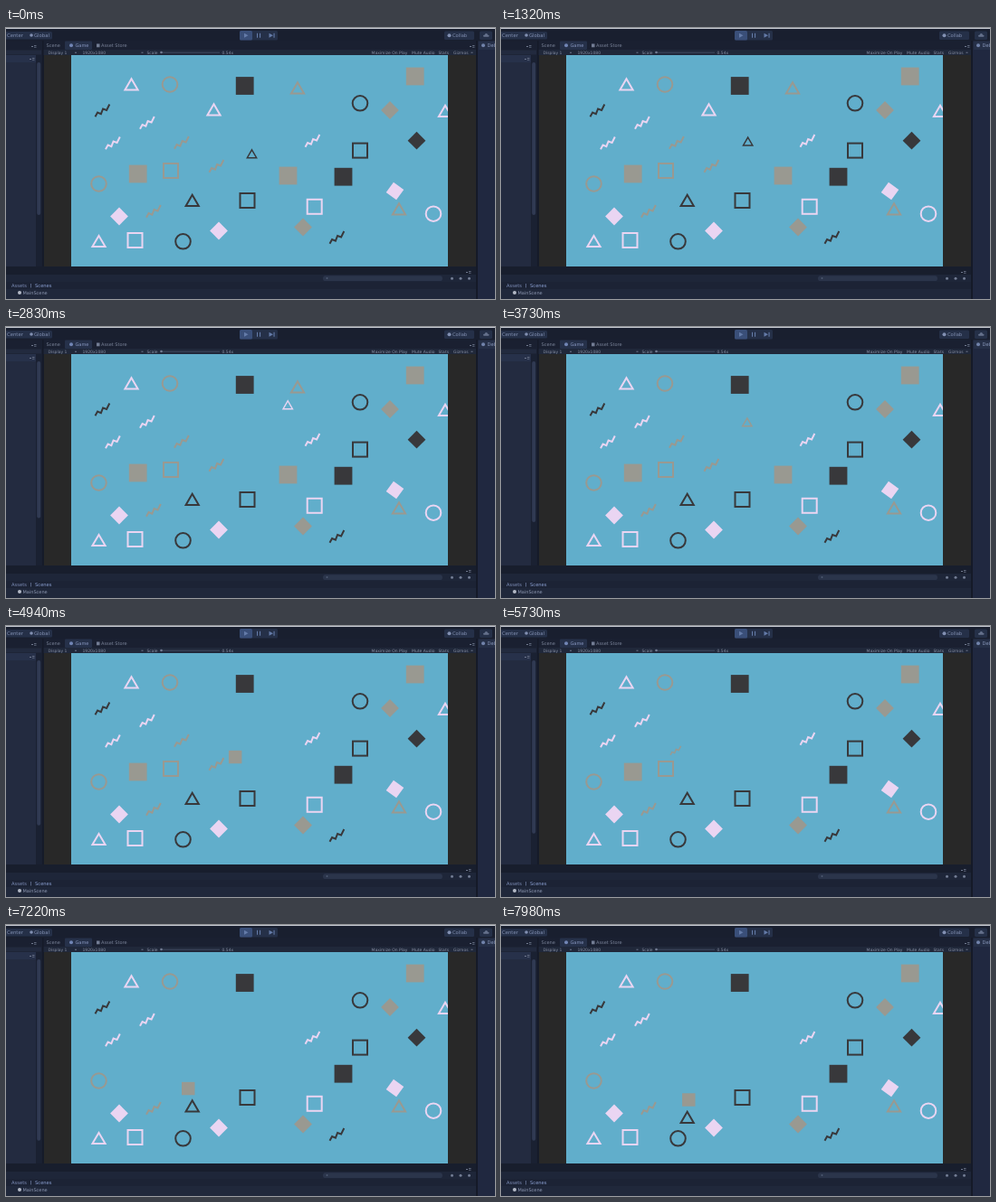
Recreate the animation shown at these times as an HTML page with a canvas. Size 540 by 300 pixels, loop 8000 ms.

```html
<!DOCTYPE html>
<html lang="en">
<head>
<meta charset="utf-8">
<title>Shape game in an editor</title>
<style>
html, body { margin: 0; width: 100%; height: 100%; overflow: hidden; background: #1a2031; }
canvas { display: block; width: 540px; height: 300px; }
</style>
</head>
<body>
<canvas id="stage" width="540" height="300"></canvas>
<script>
const ctx = document.getElementById('stage').getContext('2d');
const LOOP = 8000, STEP = 10;
const PINK = '#ead5f2', DARK = '#38383b', GRAY = '#999991', BLUE = '#61aecb';
const SMALL = 0.73;   // player size against the other shapes
const TOUCH = 20;     // distance at which a matching shape is taken
const PUSH = 19;      // gap kept to a shape that does not match
const FONT = '"DejaVu Sans", Verdana, sans-serif';

// Bursts of steering: start and end time, bend of the curve, stop
const START = [271.5, 139];
const MOVES = [
  [580, 1350, [294, 103], [271, 127]],
  [1450, 2250, [252, 110], [234, 93]],
  [2280, 3050, [308, 111], [326, 65]],
  [3120, 3910, [279, 94], [263, 115]],
  [3940, 4730, [322, 168], [285, 151]],
  [4760, 5530, [210, 139], [197, 121]],
  [5570, 6140, [195, 155], [155.5, 161]],
  [6340, 7130, [206, 168], [200.5, 177.5]],
  [7160, 7520, [202, 190], [211.5, 178.5]],
  [7690, 7980, [209, 186], [207.3, 193.5]]
];

const LEVEL = [
  ['tri', PINK, [138.5, 62], [485, 91.5], [102.5, 235.7], [229.5, 90]],
  ['tri', GRAY, [434, 200], [322, 66]],
  ['tri', DARK, [205.7, 190.5]],
  ['ring', GRAY, [181, 62.5], [102.5, 172.5]],
  ['ring', DARK, [391, 83.3], [195.5, 236.3]],
  ['ring', PINK, [472, 205.7]],
  ['box', DARK, [263.7, 64], [372.5, 164.7]],
  ['box', GRAY, [451.7, 53.5], [311.5, 163.5], [145.7, 161.5]],
  ['gem', GRAY, [424, 91], [328, 220.5]],
  ['gem', DARK, [453.5, 124.7]],
  ['gem', PINK, [125, 208.5], [235, 224.5]],
  ['tilted', PINK, [429.5, 180.5]],
  ['frame', DARK, [391, 135.6], [266.5, 191]],
  ['frame', PINK, [340.7, 197.8], [142.5, 235]],
  ['frame', GRAY, [182, 158]],
  ['zig', DARK, [106.5, 91.5], [365.5, 232]],
  ['zig', PINK, [156, 105], [118, 127.5], [338.5, 125]],
  ['zig', GRAY, [163, 203], [194, 127], [232.5, 153]]
];

function playerAt(t) {
  let from = START;
  for (const [begin, end, bend, stop] of MOVES) {
    if (t < begin) break;
    if (t < end) {
      const k = (t - begin) / (end - begin), j = 1 - k;
      return from.map((a, i) => j * j * a + 2 * j * k * bend[i] + k * k * stop[i]);
    }
    from = stop;
  }
  return from;
}

// Runs the game rules from the start of the loop up to t
function world(t) {
  let shapes = LEVEL.flatMap(([kind, color, ...spots]) =>
    spots.map(([x, y]) => ({ kind, color, x, y })));
  const total = shapes.length;
  let look = { kind: 'tri', color: DARK };
  for (let now = 0; now <= t; now += STEP) {
    const [px, py] = playerAt(now);
    shapes = shapes.filter(s => {
      const dx = s.x - px, dy = s.y - py;
      if (Math.hypot(dx, dy) > TOUCH) return true;
      if (s.kind === look.kind || s.color === look.color) {
        look = s;
        return false;
      }
      if (Math.abs(dx) < PUSH / 2) s.y = py + Math.sign(dy) * PUSH;
      return true;
    });
  }
  return { shapes, look, taken: total - shapes.length };
}

function line(points, closed) {
  ctx.beginPath();
  points.forEach(([x, y]) => ctx.lineTo(x, y));
  if (closed) ctx.closePath();
  ctx.stroke();
}

function square(half, turn = 0) {
  ctx.rotate(turn);
  ctx.fillRect(-half, -half, 2 * half, 2 * half);
}

const KINDS = {
  tri() { line([[0, -5.8], [7.1, 6.4], [-7.1, 6.4]], true); },
  ring() { ctx.beginPath(); ctx.arc(0, 0, 8.3, 0, 7); ctx.stroke(); },
  box() { square(9.9); },
  gem() { square(7, Math.PI / 4); },
  tilted() { square(7, Math.PI / 5); },
  frame() { ctx.strokeRect(-8, -8, 16, 16); },
  zig() { line([[-8, 6.7], [-5.4, 2], [-1.6, 3.6], [0.6, -2], [4.6, -0.6], [7.8, -7]]); }
};

function shape({ kind, color }, x, y, scale = 1) {
  ctx.save();
  ctx.translate(x, y);
  ctx.scale(scale, scale);
  ctx.fillStyle = ctx.strokeStyle = color;
  ctx.lineWidth = 2;
  KINDS[kind]();
  ctx.restore();
}

function rect(color, x, y, w, h, r = 0) {
  ctx.fillStyle = color;
  ctx.beginPath();
  ctx.roundRect(x, y, w, h, r);
  ctx.fill();
}

function dot(color, x, y, r = 2) {
  ctx.fillStyle = color;
  ctx.beginPath();
  ctx.arc(x, y, r, 0, 7);
  ctx.fill();
}

function text(str, x, y, size = 5, color = '#7c859b') {
  ctx.font = `${size}px ${FONT}`;
  ctx.fillStyle = color;
  ctx.fillText(str, x, y);
}

function arrow(x, y, color) {
  ctx.fillStyle = color;
  ctx.beginPath();
  ctx.moveTo(x, y - 2.5);
  ctx.lineTo(x + 4.5, y);
  ctx.lineTo(x, y + 2.5);
  ctx.fill();
}

function menuMark(x, y) {
  const color = '#70798f';
  rect(color, x, y, 2, 1);
  rect(color, x + 3, y - 1, 2.5, 0.8);
  rect(color, x + 3, y + 0.8, 2.5, 0.8);
}

function topBar() {
  const button = '#253048', ink = '#8290b2', play = '#647ba8';
  rect('#191f2f', 0, 0, 540, 15);
  rect('#c4c8d0', 0, 0, 540, 1);
  rect(button, -4, 4, 55, 8.5, 1.5);
  text('Center', 1, 10.2, 5.3, ink);
  dot(ink, 28, 8, 1.8);
  text('Global', 31, 10.2, 5.3, ink);
  rect(button, 258, 3, 42, 10.5, 1.5);
  rect('#3a4f79', 258, 3, 14, 10.5, 1.5);
  arrow(263, 8.2, play);
  for (const x of [277, 280, 295.5]) rect(play, x, 5.7, 1.1, 5);
  arrow(290.5, 8.2, play);
  rect(button, 484, 3.5, 33, 9.5, 1.5);
  dot(ink, 489.5, 8.2);
  text('Collab', 493, 10.2, 5.2, ink);
  rect(button, 523, 3.5, 14, 9.5, 1.5);
  rect('#65718c', 527, 7.8, 6.5, 2, 1);
  dot('#65718c', 530.3, 7.6, 1.6);
}

function sidePanels(taken) {
  rect('#1a2031', 0, 15, 40, 258);
  menuMark(28, 20);
  rect('#222a3e', 0, 24.5, 39, 5);
  rect('#232b40', 0, 30, 33, 242);
  rect('#27314a', 0, 30, 33, 8);
  menuMark(26, 34);
  rect('#1a2132', 33.5, 30, 5.5, 242);
  rect('#303a53', 34.2, 38, 4, 169 + taken * 4.55, 2);
  rect('#151a28', 40, 14, 1.6, 258);
  rect('#151a28', 519, 14, 2, 286);
  rect('#202840', 521, 24, 19, 276);
  rect('#263048', 521.5, 14.5, 18.5, 9.5);
  dot('#7183aa', 527, 19.3);
  text('Debug', 531.5, 21.2, 5.2, '#8998bb');
}

function gameTabs() {
  rect('#1a2031', 41.6, 14, 477.4, 10);
  rect('#26314a', 65, 14.5, 30, 9.5, 1);
  text('Scene', 44.5, 21.2);
  dot('#7185b5', 72, 19.3);
  text('Game', 76.5, 21.2, 5, '#8b9bc4');
  rect('#737d94', 100, 17.5, 3.5, 3.8);
  text('Asset Store', 105, 21.2);
  menuMark(512, 20);

  rect('#20283a', 41.6, 24, 477.4, 6);
  const labels = {
    'Display 1': 46.5, '1920x1080': 84.5, 'Scale': 155.5, '0.54x': 238.5,
    'Maximize On Play': 403.5, 'Mute Audio': 448, 'Stats': 477.5, 'Gizmos': 494
  };
  for (const [label, x] of Object.entries(labels)) text(label, x, 28.6, 4.5, '#868ea2');
  for (const x of [76, 149.5, 513.5]) rect('#70798f', x, 26.7, 2, 1);
  rect('#4d576e', 172, 26.7, 64, 0.8);
  dot('#737d94', 171.5, 27, 1.3);
}

function bottomPanel() {
  rect('#181e2d', 0, 264, 519, 9);
  menuMark(508, 270);
  rect('#1e2639', 0, 273, 519, 8);
  rect('#2b354b', 350, 274.3, 132, 5.8, 2.9);
  dot('#4f5a72', 354.5, 277, 1);
  for (const x of [492.5, 502, 511.5]) dot('#737d94', x, 277.2, 1.5);
  rect('#1c2335', 0, 281, 519, 8);
  text('Assets', 6, 287, 5.2, '#7e8eb8');
  rect('#69779b', 27, 283, 0.8, 4.5);
  text('Scenes', 32, 287, 5.2, '#8ba0d2');
  rect('#20283b', 0, 289, 519, 11);
  dot('#b4bac7', 15, 293);
  text('MainScene', 18.5, 295, 5, '#8e99b3');
}

function field(t, { shapes, look }) {
  rect('#282828', 42, 30, 477, 234);
  ctx.save();
  ctx.beginPath();
  ctx.rect(72, 30, 416, 234);
  ctx.clip();
  rect(BLUE, 72, 30, 416, 234);
  for (const s of shapes) shape(s, s.x, s.y);
  shape(look, ...playerAt(t), SMALL);
  ctx.restore();
}

function draw() {
  const t = (performance.now() - start) % LOOP;
  const state = world(t);
  rect('#1a2031', 0, 0, 540, 300);
  topBar();
  sidePanels(state.taken);
  gameTabs();
  field(t, state);
  bottomPanel();
  requestAnimationFrame(draw);
}

const start = performance.now();
draw();
</script>
</body>
</html>
```
